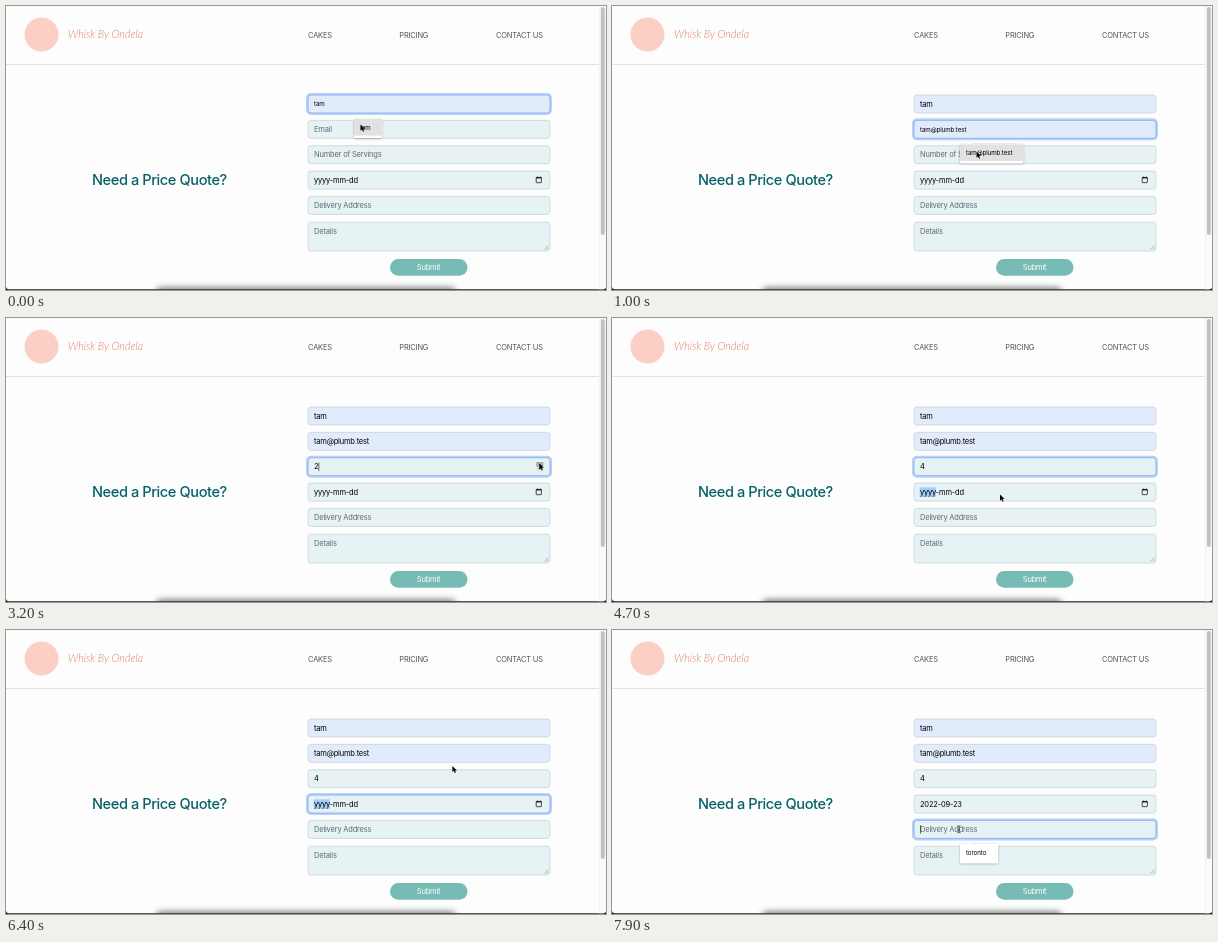
Recreate the animation shown at these times as an HTML page. Size 600 by 284 pixels, loop 8000 ms.

```html
<!DOCTYPE html>
<html lang="en">
<head>
<meta charset="utf-8">
<title>Price quote form</title>
<style>
  html, body { margin: 0; width: 100%; height: 100%; overflow: hidden; }
  svg { display: block; width: 600px; height: 284px; background: #222; }
  text { font: 7.5px Inter, "Liberation Sans", sans-serif; letter-spacing: -.2px; white-space: pre; }
  .nav { fill: #505458; }
  .logo { font: italic 300 10.8px Lato, sans-serif; letter-spacing: 0; fill: #dd8069; }
  .title { font-size: 14.6px; font-weight: 500; letter-spacing: -.42px; fill: #07616a; }
  .hint { fill: #626d73; }
  .small { font-size: 6.2px; letter-spacing: -.1px; }
</style>
</head>
<body>
<svg id="stage" viewBox="0 0 600 284">
  <defs>
    <clipPath id="pageClip"><rect y="-10" width="600" height="293.2" rx="3"/></clipPath>
    <filter id="blur" x="-10%" y="-200%" width="120%" height="500%"><feGaussianBlur stdDeviation="3"/></filter>
    <filter id="soft" x="-20%" y="-40%" width="140%" height="180%"><feGaussianBlur stdDeviation="1"/></filter>
  </defs>
  <g clip-path="url(#pageClip)">
    <rect width="600" height="284" fill="#fdfdfd"/>
    <path d="M0 58.5H593" stroke="#d9dbdc" stroke-width=".8"/>
    <circle cx="35.5" cy="28.5" r="17" fill="#fccfc4"/>
    <text class="logo" x="62" y="32">Whisk By Ondela</text>
    <text class="nav" x="302" y="32">CAKES</text>
    <text class="nav" x="393.3" y="32">PRICING</text>
    <text class="nav" x="490" y="32">CONTACT US</text>
    <text class="title" x="86" y="179.2">Need a Price Quote?</text>
    <g id="form"></g>
    <rect x="384" y="253" width="77.5" height="16.8" rx="8.4" fill="#76bcb4"/>
    <text x="422.6" y="264.1" text-anchor="middle" fill="#fff">Submit</text>
    <rect x="593" width="7" height="284" fill="#fafafa"/>
    <path d="M593.2 0V284" stroke="#e6e6e6" stroke-width=".5"/>
    <rect x="594.8" y="1" width="4" height="228" rx="2" fill="#c1c1c1"/>
    <rect x="150" y="281.5" width="300" height="12" rx="5" opacity=".5" filter="url(#blur)"/>
  </g>
  <g id="overlay"></g>
</svg>
<script>
const LOOP = 8000, STEP = 100;
const LEFT = 302, WIDTH = 242, TEXT_X = 308;
const NAME = 'tam', EMAIL = 'tam@plumb.test', CITY = 'toronto';
const TEAL = '#e6f2f4', FILLED = '#e2ebfc';
const $ = id => document.getElementById(id);

function add(parent, tag, attrs = {}, text = '') {
  const el = document.createElementNS('http://www.w3.org/2000/svg', tag);
  set(el, attrs);
  el.textContent = text;
  parent.appendChild(el);
  return el;
}
function set(el, attrs) {
  for (const key in attrs) el.setAttribute(key, attrs[key]);
}
const show = (el, on) => set(el, { visibility: on ? 'visible' : 'hidden' });

const form = $('form'), overlay = $('overlay');

function makeField(mid, hint, height = 18) {
  const box = { x: LEFT, y: mid - 9, width: WIDTH, height, rx: 3 };
  const ring = add(form, 'rect', { ...box, fill: 'none', stroke: '#b6d2fb', 'stroke-width': 4 });
  const body = add(form, 'rect', { ...box, fill: TEAL, stroke: '#c5d0d5', 'stroke-width': .7 });
  const edge = add(form, 'rect', { ...box, fill: 'none', stroke: '#86b2f7', 'stroke-width': .8 });
  const mark = add(form, 'rect', { x: TEXT_X - .3, y: mid - 4.7, height: 9.6, fill: '#a5cdfa' });
  const label = add(form, 'text', { x: TEXT_X, y: mid + 2.7 }, hint);
  return { mid, hint, ring, body, edge, mark, label };
}

const [nameField, emailField, countField, dateField, addressField] =
  ['Name', 'Email', 'Number of Servings', 'yyyy-mm-dd', 'Delivery Address']
    .map((hint, i) => makeField(98 + 25.35 * i, hint));
const detailsField = makeField(225.2, 'Details', 28.8);
const fields = [nameField, emailField, countField, dateField, addressField, detailsField];
add(form, 'path', { d: 'M538.5 243.5l4-4M540.7 243.5l1.8-1.8', stroke: '#7d8a8e', 'stroke-width': .5 });

// Calendar icon
add(form, 'rect', { x: 530.2, y: 171.5, width: 5.2, height: 5.2, rx: .5, fill: 'none', stroke: '#111', 'stroke-width': .75 });
add(form, 'path', { d: 'M530 171.9h5.6M531.4 170.6v1M534.2 170.6v1', stroke: '#111', 'stroke-width': 1 });

const spinner = add(form, 'g');
add(spinner, 'rect', { x: 530.3, y: 144, width: 7, height: 9.4, fill: '#e4e4e4' });
add(spinner, 'rect', { x: 530.3, y: 144, width: 7, height: 4.7, fill: '#a9a9a9' });
add(spinner, 'path', { d: 'M532 147.4l1.8-2 1.8 2zM532 150.1l1.8 2 1.8-2z', fill: '#444' });

const caret = add(form, 'rect', { width: .6, height: 8.4 });

const popup = add(overlay, 'g');
const popShadow = add(popup, 'rect', { x: 348, y: 15.2, height: 19.5, rx: 1.5, opacity: .3, filter: 'url(#soft)' });
add(popup, 'path', { d: 'M354.5 15l3-3 3 3z', fill: '#fff', stroke: '#eee', 'stroke-width': .3 });
const popBox = add(popup, 'rect', { x: 348, y: 14.6, height: 19.5, rx: 1.2, fill: '#fff' });
const popRow = add(popup, 'rect', { x: 348, y: 15, height: 16.6, fill: '#e1e1e1' });
const popText = add(popup, 'text', { class: 'small', x: 354, y: 26.1 });

const arrow = add(overlay, 'path', {
  d: 'M0 0V6.2L1.5 4.9 2.5 7.2 3.6 6.7 2.6 4.5H4.6Z',
  stroke: '#fff', 'stroke-width': .6, 'paint-order': 'stroke'
});
const beam = add(overlay, 'path', {
  d: 'M-1.6-3.6Q0-3.6 0-2.6V2.6Q0 3.6-1.6 3.6M1.6-3.6Q0-3.6 0-2.6M0 2.6Q0 3.6 1.6 3.6M-.9 .9H.9',
  fill: 'none', stroke: '#222', 'stroke-width': .7
});

// Pointer stops: time, x, y
const path = [
  [0, 354.5, 118.5], [300, 354.5, 118.5], [600, 357, 123], [900, 364.1, 145.3],
  [1000, 364.5, 145.6], [1200, 364.5, 145.6], [1600, 370, 148.5], [2000, 380, 149],
  [2600, 533.3, 145.3], [3900, 533.3, 145.3], [4600, 388, 176.5], [4700, 388, 176.5],
  [5400, 535, 171], [5900, 535, 171], [6800, 383, 110.8], [7100, 383, 110.8],
  [7600, 347, 199.3], [LOOP, 347, 199.3]
];
const focusLog = [
  [-1000, nameField], [450, emailField], [1680, countField], [4685, dateField], [7620, addressField]
];
const ease = p => p * p * (3 - 2 * p);
const clamp = v => Math.max(0, Math.min(1, v));
const between = (t, a, b) => t >= a && t < b;

function pointerAt(t) {
  const i = Math.max(1, path.findIndex(p => p[0] > t));
  const [t0, x0, y0] = path[i - 1], [t1, x1, y1] = path[i];
  const k = ease((t - t0) / (t1 - t0));
  return [x0 + (x1 - x0) * k, y0 + (y1 - y0) * k];
}

function ringAt(field, t) {
  const i = focusLog.findIndex(f => f[1] === field);
  if (i < 0) return 0;
  const fade = start => ease(clamp((t - start) / 150));
  return fade(focusLog[i][0]) - (focusLog[i + 1] ? fade(focusLog[i + 1][0]) : 0);
}

function fill(field, value, { preview = false, auto = false } = {}) {
  const isDate = field === dateField;
  field.label.textContent = value || field.hint;
  set(field.label, {
    class: preview ? 'small' : value || isDate ? '' : 'hint',
    y: field.mid + (preview ? 2.3 : 2.7)
  });
  set(field.body, { fill: auto ? FILLED : TEAL });
}

function setPopup(field, value, hover) {
  show(popup, !!field);
  if (!field) return;
  popText.textContent = value;
  const width = popText.getComputedTextLength() + (value === CITY ? 18 : 17);
  for (const el of [popShadow, popBox, popRow]) set(el, { width });
  set(popRow, { opacity: hover ? 1 : 0 });
  set(popup, { transform: `translate(0 ${field.mid})` });
}

function render(t) {
  const count = [2800, 3100, 3400, 3700].filter(c => t >= c).length;
  const [x, y] = pointerAt(t);
  const namePreview = t < 100, emailPreview = between(t, 900, 1200);

  fill(nameField, NAME, { preview: namePreview, auto: true });
  fill(emailField, t >= 900 ? EMAIL : '', { preview: emailPreview, auto: t >= 900 });
  fill(countField, count ? String(count) : '');
  fill(dateField, t >= 6900 ? '2022-09-23' : '');
  fill(addressField, '');
  fill(detailsField, '');

  for (const f of fields) {
    const ring = ringAt(f, t);
    set(f.ring, { opacity: ring });
    set(f.edge, { opacity: ring });
    show(f.mark, false);
  }
  if (between(t, 4685, 7620)) {
    set(dateField.mark, { width: dateField.label.getSubStringLength(0, 4) + .5 });
    show(dateField.mark, true);
  }

  const focus = focusLog.filter(f => f[0] <= t).pop();
  const field = focus[1];
  const typed = field === nameField || field === emailField && t >= 900 || field === countField && count;
  show(caret, field !== dateField && !namePreview && !emailPreview && (t - focus[0] + LOOP) % 1000 < 600);
  set(caret, {
    x: TEXT_X + (typed ? field.label.getComputedTextLength() + .2 : 0),
    y: field.mid - 4.2
  });

  if (namePreview) setPopup(nameField, NAME, true);
  else if (between(t, 500, 1200)) setPopup(emailField, EMAIL, emailPreview);
  else if (t >= 7700) setPopup(addressField, CITY, false);
  else setPopup(null);

  const onSpinner = between(t, 2500, 4000);
  show(spinner, onSpinner);
  const overText = x > LEFT && x < 529 && fields.some(f => f !== dateField && Math.abs(y - f.mid) < 9);
  const onPopup = namePreview || emailPreview;
  const useBeam = overText && !onPopup && !onSpinner;
  show(beam, useBeam);
  show(arrow, !useBeam);
  for (const el of [beam, arrow]) set(el, { transform: `translate(${x} ${y})` });
}

const start = performance.now();
function tick() {
  const t = (performance.now() - start) % LOOP;
  render(Math.floor(t / STEP) * STEP);
  requestAnimationFrame(tick);
}
render(0);
requestAnimationFrame(tick);
</script>
</body>
</html>
```
